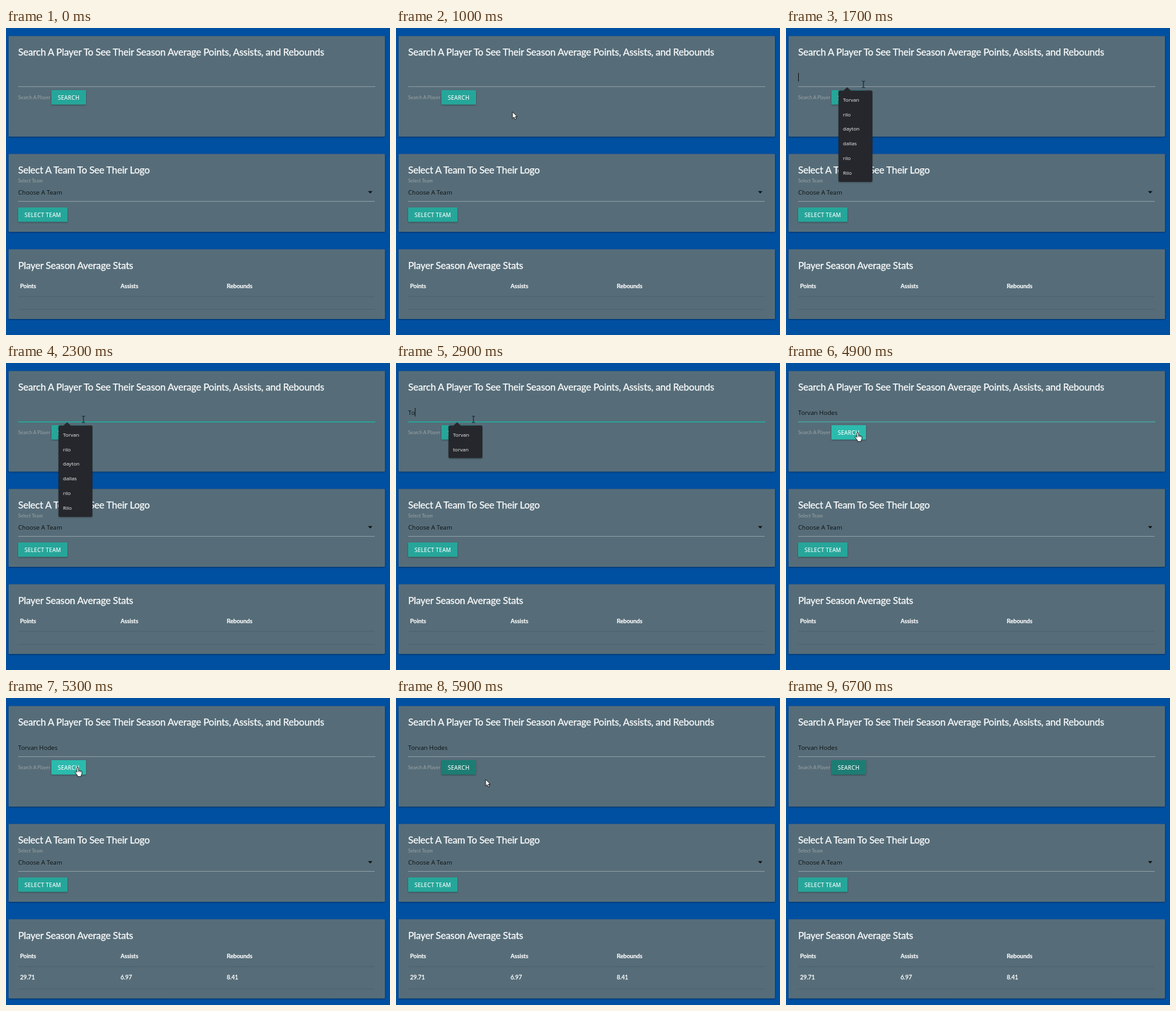
Animation, 600 px wide and 479 px high, one loop 6800 ms. Source, as an HTML page:

```html
<!DOCTYPE html>
<html lang="en">
<head>
<meta charset="utf-8">
<title>Player search</title>
<style>
  html, body { margin: 0; width: 100%; height: 100%; overflow: hidden; background: #0050a2; }
  svg { display: block; width: 600px; height: 479px; }
  text { white-space: pre; font-family: "Open Sans", "Noto Sans", sans-serif; }
  .card { fill: #566d79; filter: drop-shadow(0 1px 1.2px rgba(0,0,0,.4)); }
  .head { font: 15px Lato, sans-serif; letter-spacing: -.16px; fill: #fff; stroke: #fff; stroke-width: .25px; }
  .label { font: 7.4px Lato, sans-serif; fill: #9ea3a5; }
  .field { font-size: 9.6px; fill: #0d1214; }
  .btn { fill: #26a69a; filter: drop-shadow(0 1px 1px rgba(0,0,0,.35)); }
  .btnText { font-size: 8.5px; letter-spacing: .35px; fill: #fff; stroke: #fff; stroke-width: .15px; }
  .th, .td { font: bold 9.2px Lato, sans-serif; letter-spacing: -.1px; fill: #fff; stroke: #fff; stroke-width: .15px; }
  .td { font-weight: 400; stroke-width: .3px; }
  .rule { fill: #8d9ba2; }
  .row { fill: rgba(0,0,0,.13); }
  .popup { fill: #26272c; filter: drop-shadow(0 1px 1px rgba(0,0,0,.35)); }
  .item { font-size: 8px; fill: #f1f1f2; }
</style>
</head>
<body>
<svg viewBox="0 0 600 479">
  <rect width="600" height="479" fill="#0050a2"/>

  <rect class="card" x="4" y="12.6" width="588" height="157" rx="1"/>
  <text class="head" x="19" y="43">Search A Player To See Their Season Average Points, Assists, and Rebounds</text>
  <text class="field" id="typed" x="19" y="81"></text>
  <rect id="caret" y="70" width="1" height="13.5" fill="#0d1214"/>
  <rect id="line" class="rule" x="19" y="91" width="558" height="1"/>
  <text class="label" x="19" y="110.8">Search A Player</text>
  <rect class="btn" id="search" x="71" y="97" width="54" height="22.5" rx="1"/>
  <text class="btnText" x="81" y="111.6">SEARCH</text>

  <rect class="card" x="4" y="196.4" width="588" height="121.6" rx="1"/>
  <text class="head" x="19" y="227">Select A Team To See Their Logo</text>
  <text class="label" x="19" y="241">Select Team</text>
  <text class="field" x="19" y="260">Choose A Team</text>
  <path d="M565.6 254.6h7l-3.5 3.6z" fill="#0d1214"/>
  <rect class="rule" x="19" y="270" width="557" height="1"/>
  <rect class="btn" x="19" y="280" width="77" height="22.5" rx="1"/>
  <text class="btnText" x="29" y="294.7">SELECT TEAM</text>

  <rect class="card" id="stats" x="4" y="345.3" width="588" height="108.7" rx="1"/>
  <text class="head" x="19" y="376">Player Season Average Stats</text>
  <text class="th" x="22" y="405.5">Points</text>
  <text class="th" x="179" y="405.5">Assists</text>
  <text class="th" x="345" y="405.5">Rebounds</text>
  <rect class="row" x="19" y="418.5" width="557" height="1"/>
  <rect class="row" id="lastRow" x="19" width="557" height="1"/>
  <g id="values">
    <text class="td" x="22" y="439.3">29.71</text>
    <text class="td" x="179" y="439.3">6.97</text>
    <text class="td" x="345" y="439.3">8.41</text>
  </g>

  <g id="popup">
    <path class="popup" id="box"/>
    <g id="items"></g>
  </g>

  <g id="cursor">
    <path id="beam" d="M-2.5 -5h2l.5 .6l.5 -.6h2M0 -4.4v9M-2.5 5h2l.5 -.6l.5 .6h2" fill="none" stroke="#15191b"/>
    <path id="arrow" d="M0 0v10.4l2.4 -2.2l1.7 3.8l1.9 -.9l-1.7 -3.6h3.2z" fill="#fff" stroke="#111" stroke-width=".9"/>
    <g id="hand" fill="#fff" stroke="#111" stroke-width=".9" stroke-linejoin="round">
      <path d="M-1.2 .9q1.2 -1.8 2.4 0v4l1.7 .2l1.8 .5l1.6 .8q.6 .5 .5 1.6l-.3 2.6l-1.2 2.2v1.8h-5.6v-1.6l-2.6 -3.4l-1.4 -2.3q.3 -1.2 1.6 -.6l1.5 1.4z"/>
      <path d="M1.2 5v2.6M3 5.4v2.3M4.8 5.9v2" fill="none" stroke-width=".7"/>
    </g>
  </g>
</svg>
<script>
const LOOP = 6800, STEP = 100;
const FOCUS = 1600, BLUR = 4800, HOVER = 4700, LEAVE = 5600, RESULT = 5300;
const NAME = 'Torvan Hodes';
const keyTimes = [2500, 2700, 3000, 3100, 3200, 3300, 3500, 3700, 3800, 3900, 4000, 4200];
const recent = ['Torvan', 'rilo', 'dayton', 'dallas', 'rilo', 'Rilo'];
const matches = ['Torvan', 'torvan'];

// time, x, y
const path = [
  [500, 300, 452], [700, 262, 330], [950, 190, 150], [1200, 150, 54], [1500, 121, 88],
  [4400, 121, 88], [4700, 112, 108], [5400, 112, 108], [5700, 130, 121],
  [5900, 140, 127], [6100, 190, 92], [6400, 340, 17]
];

const $ = id => document.getElementById(id);
const show = (id, on) => { $(id).style.display = on ? '' : 'none'; };
const clamp = v => Math.max(0, Math.min(1, v));
const mix = (a, b, p) => `rgb(${a.map((v, i) => Math.round(v + (b[i] - v) * p))})`;
const GREY = [141, 155, 162], TEAL = [38, 166, 154], LIGHT = [43, 187, 173], DARK = [29, 125, 116];

function cursorAt(t) {
  const i = path.findIndex(k => k[0] > t);
  if (i < 1) return null;
  const [t0, x0, y0] = path[i - 1], [t1, x1, y1] = path[i];
  const p = (t - t0) / (t1 - t0);
  return [x0 + (x1 - x0) * p, y0 + (y1 - y0) * p];
}

function drawCursor(t) {
  const pos = cursorAt(t);
  show('cursor', pos);
  if (!pos) return;
  const [x, y] = pos;
  const onField = y > 64 && y < 92 && t < 5000;
  const onButton = x > 71 && x < 125 && y >= 97 && y < 120;
  $('cursor').setAttribute('transform', `translate(${x} ${y})`);
  show('beam', onField);
  show('hand', onButton);
  show('arrow', !onField && !onButton);
}

function drawField(t) {
  const count = keyTimes.filter(k => k <= t).length;
  const typed = $('typed');
  typed.textContent = NAME.slice(0, count);
  const since = t - (count ? keyTimes[count - 1] : FOCUS);
  show('caret', t >= FOCUS && t < BLUR && since % 1000 < 500);
  $('caret').setAttribute('x', 19 + (count ? typed.getComputedTextLength() : 0));

  const focus = clamp((t - FOCUS - 100) / 300) * (1 - clamp((t - BLUR) / 300));
  $('line').style.fill = mix(GREY, TEAL, focus);
  $('line').setAttribute('height', 1 + focus * .8);
  drawPopup(t, count);
}

let listed = null;
function drawPopup(t, count) {
  show('popup', t >= FOCUS && count < 7);
  const list = count ? matches : recent;
  if (list === listed) return;
  listed = list;
  const bottom = 102.5 + list.length * 22.9;
  $('box').setAttribute('d', `M84 97.5h6l5.5 -5l5.5 5h32q2 0 2 2V${bottom - 2}q0 2 -2 2H84q-2 0 -2 -2V99.5q0 -2 2 -2z`);
  $('items').innerHTML = list.map((s, i) =>
    `<text class="item" x="89" y="${114.7 + i * 22.8}">${s}</text>`).join('');
}

function drawResult(t) {
  const done = t >= RESULT;
  show('values', done);
  $('stats').setAttribute('height', done ? 123.5 : 108.7);
  $('lastRow').setAttribute('y', done ? 453.5 : 438.5);
  $('search').style.fill = t < LEAVE
    ? mix(TEAL, LIGHT, clamp((t - HOVER + 100) / 300))
    : mix(LIGHT, DARK, clamp((t - LEAVE + 100) / 300));
}

function frame() {
  const t = Math.floor(performance.now() % LOOP / STEP) * STEP;
  drawField(t);
  drawResult(t);
  drawCursor(t);
  requestAnimationFrame(frame);
}
frame();
</script>
</body>
</html>
```
